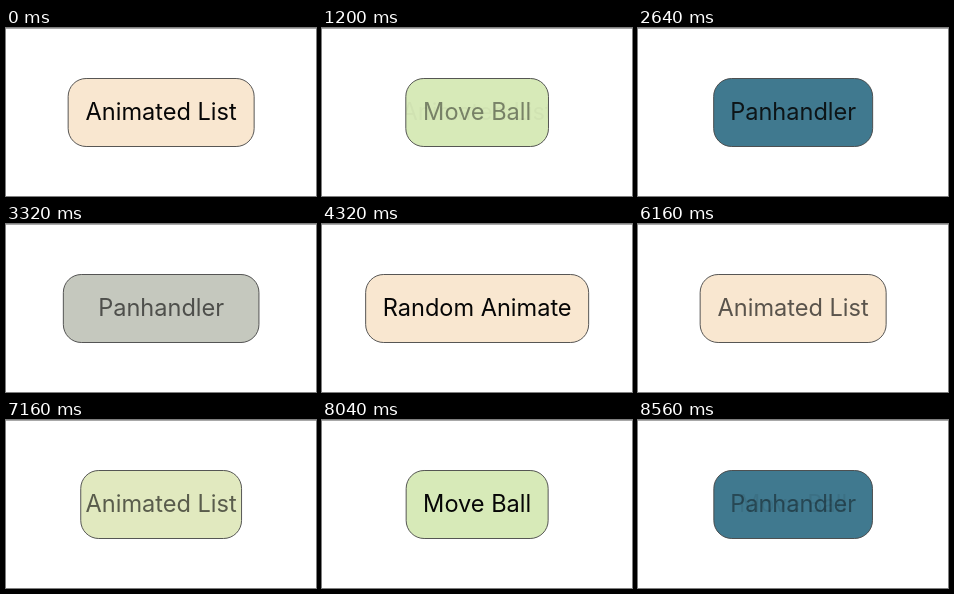
Recreate the animation shown at these times as an HTML page with a canvas. Size 310 by 168 pixels, loop 8600 ms.

```html
<!DOCTYPE html>
<html lang="en">
<head>
<meta charset="utf-8">
<title>Label switcher</title>
<style>
  html, body { margin: 0; width: 100%; height: 100%; overflow: hidden; background: #fff; }
  canvas { display: block; width: 310px; height: 168px; }
</style>
</head>
<body>
<canvas id="stage"></canvas>
<script>
const W = 310, H = 168, LOOP = 8600;
const CENTER = 155.15, TOP = 50.5, BOX_H = 68, RADIUS = 18, BASELINE = 92;

const items = [
  { text: 'Animated List', width: 186, color: [249, 231, 208] },
  { text: 'Move Ball', width: 142, color: [215, 234, 184] },
  { text: 'Panhandler', width: 159, color: [64, 121, 143] },
  { text: 'Random Animate', width: 223, color: [249, 231, 208] },
  { text: 'Transition Container', width: 258, color: [184, 209, 223] }
];

// Moments at which the next label takes over
const switches = [670, 1870, 2990, 4310, 5530, 6830, 8040];

const canvas = document.getElementById('stage');
const ctx = canvas.getContext('2d');
const dpr = window.devicePixelRatio || 1;
canvas.width = W * dpr;
canvas.height = H * dpr;

const clamp = v => Math.min(1, Math.max(0, v));
const mix = (a, b, p) => a + (b - a) * p;
const easeInOut = (p, power) => p < 0.5
  ? (2 * p) ** power / 2
  : 1 - (2 - 2 * p) ** power / 2;
const easeOut = p => Math.sin(p * Math.PI / 2);

function drawLabel(text, alpha) {
  if (alpha <= 0) return;
  ctx.globalAlpha = alpha;
  ctx.fillText(text, CENTER, BASELINE);
  ctx.globalAlpha = 1;
}

function draw(time) {
  const step = switches.filter(s => s <= time).length;
  const to = items[step % items.length];
  const from = step ? items[(step - 1) % items.length] : to;
  const age = step ? time - switches[step - 1] : LOOP;

  const grow = easeInOut(clamp(age / 630), 3);
  const tint = easeInOut(clamp(age / 530), 2);
  const fadeOut = 1 - clamp(age / 540) ** 2;
  const fadeIn = easeOut(clamp((age - 340) / 640));

  const width = mix(from.width, to.width, grow);
  const color = from.color.map((c, i) => Math.round(mix(c, to.color[i], tint)));

  ctx.setTransform(dpr, 0, 0, dpr, 0, 0);
  ctx.fillStyle = '#fff';
  ctx.fillRect(0, 0, W, H);
  ctx.fillStyle = '#a8a8a8';
  ctx.fillRect(0, 0, W, 1);

  ctx.beginPath();
  ctx.roundRect(CENTER - width / 2, TOP, width, BOX_H, RADIUS);
  ctx.fillStyle = `rgb(${color})`;
  ctx.fill();

  ctx.save();
  ctx.clip();
  ctx.font = '23.55px Inter, Roboto, sans-serif';
  ctx.textAlign = 'center';
  ctx.fillStyle = '#060606';
  drawLabel(from.text, fadeOut);
  drawLabel(to.text, fadeIn);
  ctx.restore();

  ctx.lineWidth = 0.9;
  ctx.strokeStyle = '#444';
  ctx.stroke();
}

const start = performance.now();
function frame() {
  draw((performance.now() - start) % LOOP);
  requestAnimationFrame(frame);
}
frame();
</script>
</body>
</html>
```
